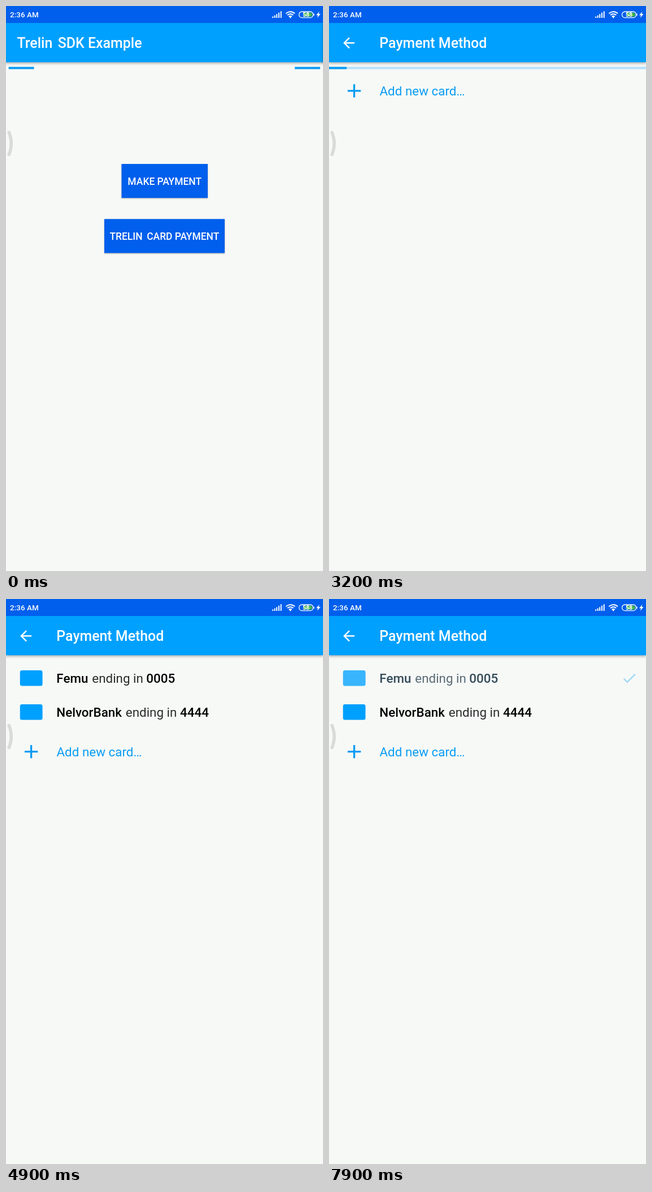
Write an HTML page that moves like this. It is 561x998 px and loops after 8000 ms.

```html
<!DOCTYPE html>
<html lang="en">
<head>
<meta charset="utf-8">
<title>Payment demo</title>
<style>
  html, body { margin: 0; width: 100%; height: 100%; overflow: hidden; background: #f7f9f7; }
  svg { display: block; width: 561px; height: 998px; overflow: hidden; }
  text { font-family: Roboto, "Noto Sans", sans-serif; white-space: pre; }
  .bold { font-weight: 500; }
  .title { font-size: 24.9px; font-weight: 500; fill: #fff; }
  .label { font-size: 17.45px; font-weight: 500; fill: #fff; }
  .item { font-size: 22.4px; }
  .end { text-anchor: end; }
  .accent { fill: #0a9cf3; }
  .bar { fill: #00a0ff; filter: drop-shadow(0 2px 2px rgba(0, 0, 0, .32)); }
  .button { fill: #005fec; filter: drop-shadow(0 1.5px 1.2px rgba(0, 0, 0, .32)); }
  .raised { fill: #005fec; filter: drop-shadow(0 4px 2.5px rgba(0, 0, 0, .3)); }
  .runner { fill: #0a9cf3; transform-box: fill-box; transform-origin: center; }
</style>
</head>
<body>
<svg viewBox="0 0 561 998">
  <rect width="561" height="998" fill="#f7f9f7"/>

  <g id="home">
    <rect class="bar" x="-20" y="30" width="601" height="69.3"/>
    <text class="title" x="19.5" y="74.3">Trelin</text>
    <text class="title end" x="240.5" y="74.3">SDK Example</text>
    <rect class="button" x="204.5" y="279" width="152.5" height="60"/>
    <text class="label" x="280.7" y="315.6" text-anchor="middle">MAKE PAYMENT</text>
    <rect class="raised" id="raised" x="174" y="376.3" width="213" height="60"/>
    <rect class="button" x="174" y="376.3" width="213" height="60"/>
    <text class="label" x="183.5" y="412.9">TRELIN</text>
    <text class="label end" x="377.3" y="412.9">CARD PAYMENT</text>
  </g>

  <g id="method">
    <rect y="30" width="561" height="968" fill="#f7f9f7"/>
    <rect class="bar" y="30" width="561" height="69.3"/>
    <path transform="translate(20.2 50.3) scale(1.247)" fill="#fff"
      d="M20 11H7.83l5.59-5.59L12 4l-8 8 8 8 1.41-1.41L7.83 13H20z"/>
    <text class="title" x="89.3" y="74.3">Payment Method</text>
    <g id="progress">
      <rect y="107.5" width="561" height="4" fill="#b5e1fb"/>
      <rect class="runner" id="runA" y="107.5" width="561" height="4"/>
      <rect class="runner" id="runB" y="107.5" width="561" height="4"/>
    </g>
    <g id="cards"></g>
    <g id="add">
      <path d="M33 149.8H56.3M44.6 138.2V161.5" stroke="#0a9cf3" stroke-width="3.3"/>
      <text class="item accent" x="89.5" y="158">Add new card…</text>
    </g>
  </g>

  <path d="M5.3 223.3Q13.2 243 5.3 262.4" fill="none" stroke="#d9dbd9" stroke-width="5.6" stroke-linecap="round"/>

  <g id="status">
    <rect width="561" height="30" fill="#005fec"/>
    <text class="bold" x="7" y="20.3" font-size="13.5" fill="#fff">2:36 AM</text>
    <path d="M472.2 21V18.5M475.7 21V16.5M479.2 21V14.2M482.9 21V11.8M486.7 21V9.3" stroke="#fff" stroke-width="2"/>
    <g fill="none" stroke="#fff" stroke-width="1.9">
      <path d="M495.3 13.3Q503.2 6.6 511.1 13.3M498 16.1Q503.2 11.8 508.4 16.1M500.6 18.7Q503.2 16.6 505.8 18.7"/>
    </g>
    <circle cx="503.2" cy="20" r="1.4" fill="#fff"/>
    <rect x="518.6" y="10" width="25" height="10.6" rx="5" fill="none" stroke="#fff" stroke-width="1.3"/>
    <path d="M527 11.8H538.5Q541.8 12 541.8 15.3T538.5 18.8H527Z" fill="#43b649"/>
    <path d="M545 13.6V17" stroke="#fff" stroke-width="1.3"/>
    <text x="531" y="19" font-size="10.5" font-weight="700" fill="#fff" text-anchor="middle">58</text>
    <path d="M554.6 9.5L549 16.3H552.2L550.8 21L556.6 14H553.2Z" fill="#fff"/>
  </g>
</svg>

<script>
const LOOP = 8000, W = 561;
const SMOOTH = 'cubic-bezier(.364,0,.636,1)';
const $ = id => document.getElementById(id);
const bez = (...p) => `cubic-bezier(${p})`;

// A saved card: badge, brand, "ending in", last digits.
function cardRow(id, y, brand, digits, xs, selected) {
  const ink = selected ? '#00a0ff' : '#000';
  const soft = selected ? '#4dbbff' : '#2b2b2b';
  const check = selected
    ? `<path transform="translate(516.6 ${y - 15.3}) scale(1.247)" fill="#00a0ff"
        d="M9 16.17L4.83 12l-1.42 1.41L9 19 21 7l-1.41-1.41z"/>` : '';
  return `<g id="${id}">
    <rect x="24.8" y="${y - 14.2}" width="39.8" height="27.4" rx="3.5" fill="#00a0ff"/>
    <text class="item bold" x="89.3" y="${y + 8.2}" fill="${ink}">${brand}</text>
    <text class="item" x="${xs[0]}" y="${y + 8.2}" fill="${soft}">ending in</text>
    <text class="item bold" x="${xs[1]}" y="${y + 8.2}" fill="${ink}">${digits}</text>${check}</g>`;
}
$('cards').innerHTML =
  cardRow('chosen', 140.2, 'Femu', '0005', [152.3, 248.3], true) +
  cardRow('plain', 140.2, 'Femu', '0005', [152.3, 248.3], false) +
  cardRow('second', 200.2, 'NelvorBank', '4444', [211.8, 308.1], false);

const cues = [];
function cue(id, start, duration, frames, easing = 'linear', iterations = 1) {
  const anim = $(id).animate(frames, { duration, easing, iterations, fill: 'both' });
  anim.pause();
  cues.push({ anim, start });
}
const fade = (id, start, ms, from, to) =>
  cue(id, start, ms, [{ opacity: from }, { opacity: to }], SMOOTH);

// Button press, then the next screen slides in.
fade('raised', 2750, 100, 0, 1);
cue('home', 2850, 300, [{ transform: 'none' }, { transform: 'translateX(-140px)' }], 'ease-out');
cue('method', 2850, 300, [{ transform: `translateX(${W}px)` }, { transform: 'none' }], 'ease-out');

// Indeterminate progress: steps of [offset, value, easing].
function run(id, prop, steps) {
  const frames = steps.map(([offset, v, easing = 'linear']) =>
    ({ offset, [prop]: prop === 'scale' ? `${v} 1` : `${v * W / 100}px`, easing }));
  cue(id, 3110, 2000, frames, 'linear', Infinity);
}
run('runA', 'translate', [
  [0, -145.17], [.2, -145.17, bez(.5, 0, .702, .496)],
  [.5915, -61.5, bez(.302, .381, .55, .956)], [1, 55.44]]);
run('runA', 'scale', [
  [0, .08], [.3665, .08, bez(.335, .125, .786, 1)],
  [.6915, .661, bez(.06, .11, .6, 1)], [1, .08]]);
run('runB', 'translate', [
  [0, -54.89, bez(.15, 0, .515, .41)], [.25, -17.24, bez(.31, .284, .8, .734)],
  [.4835, 29.5, bez(.4, .627, .6, .902)], [1, 105.39]]);
run('runB', 'scale', [
  [0, .08, bez(.205, .057, .577, .454)], [.1915, .457, bez(.152, .196, .648, 1.004)],
  [.4415, .728, bez(.258, -.003, .212, 1.382)], [1, .08]]);
fade('progress', 4270, 1, 1, 0);

// The list makes room, then the cards appear.
cue('add', 4283, 250, [{ transform: 'none' }, { transform: 'translateY(119.8px)' }], SMOOTH);
fade('cards', 4533, 120, 0, 1);

// Selecting the first card crossfades its row.
fade('plain', 7800, 250, 1, 0);
fade('chosen', 7800, 250, 0, 1);

const origin = performance.now();
function tick() {
  const t = (performance.now() - origin) % LOOP;
  for (const { anim, start } of cues) anim.currentTime = t - start;
  requestAnimationFrame(tick);
}
tick();
</script>
</body>
</html>
```
